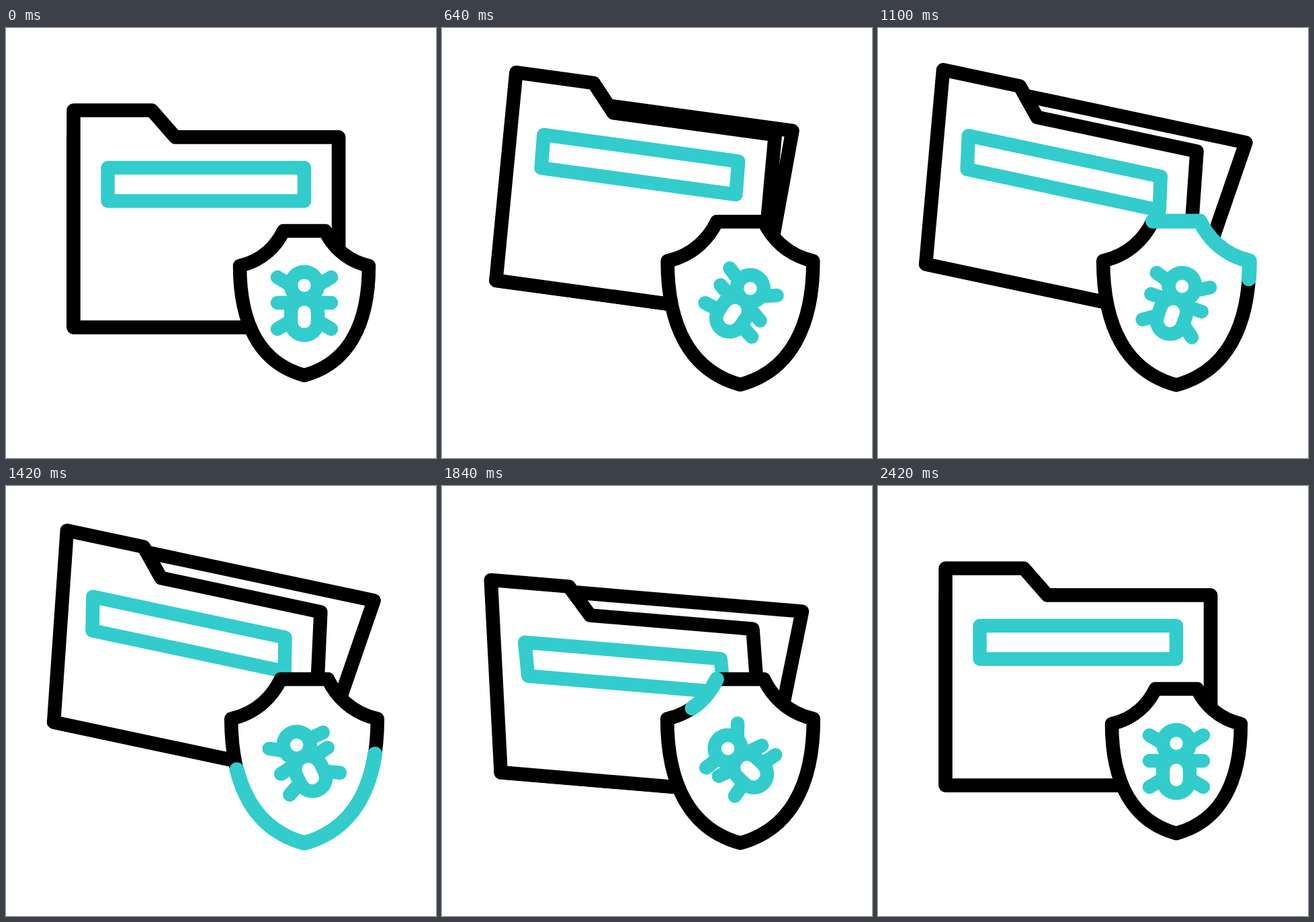
An HTML page that plays this animation: 640x640 px, repeating every 3000 ms.

```html
<!DOCTYPE html>
<html lang="en">
<head>
<meta charset="utf-8">
<title>Folder protection</title>
<style>
  html, body { margin: 0; width: 100%; height: 100%; overflow: hidden; background: #fff; }
  svg { display: block; width: 100vw; height: 100vh; }
  path, circle, rect { fill: #fff; stroke: #000; stroke-width: 20.5; stroke-linecap: round; stroke-linejoin: round; }
  .teal { stroke: #33cccc; }
  .line { fill: none; }
  #sweep { stroke-width: 22; }
</style>
</head>
<body>
<svg viewBox="0 0 640 640">
  <g id="folder">
    <path id="back"/>
    <path id="front"/>
    <path id="label" class="teal"/>
  </g>
  <path id="shield"/>
  <path id="sweep" class="teal line" pathLength="1"/>
  <g id="bug">
    <path id="legs" class="teal line"/>
    <rect class="teal" x="-20" y="-6" width="40" height="54" rx="20"/>
    <circle class="teal" cy="-26" r="20"/>
  </g>
</svg>
<script>
const LOOP = 3000, STEP = 20;
const $ = id => document.getElementById(id);
const set = (id, name, value) => $(id).setAttribute(name, value);

// Eased value from [time, value] pairs.
function track(t, keys) {
  if (t <= keys[0][0]) return keys[0][1];
  for (let i = 1; i < keys.length; i++) {
    const [t0, v0] = keys[i - 1], [t1, v1] = keys[i];
    if (t <= t1) {
      const p = (t - t0) / (t1 - t0);
      return v0 + (v1 - v0) * p * p * (3 - 2 * p);
    }
  }
  return keys[keys.length - 1][1];
}

// Goes from 0 to 1 between a and b, back to 0 between c and d.
const pulse = (t, a, b, c, d) => track(t, [[a, 0], [b, 1], [c, 1], [d, 0]]);
const poly = points => 'M' + points.map(p => p.join(' ')).join('L') + 'Z';

function drawFolder(t) {
  const lift = -49.6 * pulse(t, 200, 790, 1420, 1900);
  const tilt = 12 * pulse(t, 200, 933, 1500, 2100);
  const k = 40 * pulse(t, 225, 1355, 1780, 2370);
  const open = pulse(t, 300, 1130, 1750, 2400);
  set('folder', 'transform', `translate(0 ${lift}) rotate(${tilt} 297.5 283.5)`);

  const bx = 34 * open, by = 162.5 + 7 * open;
  set('back', 'd', poly([[100.5 + bx, by], [495 + bx, by], [495, 445.5], [100.5, 445.5]]));

  set('front', 'd', poly([
    [100.5 - k, 122.5 + k], [217 - k, 122.5 + k], [252 - k, 162.5 + k],
    [495 - k, 162.5 + k], [495, 445.5], [100.5, 445.5]
  ]));

  const top = 0.82 * k, low = 0.58 * k, drop = 1.07 * k;
  set('label', 'd', poly([
    [151.5 - top, 208 + drop], [444 - top, 208 + drop],
    [444 - low, 257.5 + drop], [151.5 - low, 257.5 + drop]
  ]));
}

function shieldPath(s) {
  const at = (x, y) => `${444 + x * s} ${409.5 + y * s} `;
  return 'M' + at(-31, -107.5) + 'L' + at(31, -107.5) +
    'C' + at(41, -86.5) + at(61, -63.5) + at(96, -55.5) +
    'C' + at(96, 30.5) + at(66, 89.5) + at(0, 107.5) +
    'C' + at(-66, 89.5) + at(-96, 30.5) + at(-96, -55.5) +
    'C' + at(-61, -63.5) + at(-41, -86.5) + at(-31, -107.5);
}

function drawShield(t) {
  const d = shieldPath(1 + 0.134 * pulse(t, 200, 700, 1900, 2400));
  set('shield', 'd', d + 'Z');
  set('sweep', 'd', d);
  const head = track(t, [[785, 0], [1715, 1]]);
  const tail = track(t, [[1090, 0], [1995, 1]]);
  const length = head - tail;
  set('sweep', 'visibility', length > 0.001 ? 'visible' : 'hidden');
  set('sweep', 'stroke-dasharray', `${Math.max(length, 0)} 2`);
  set('sweep', 'stroke-dashoffset', -tail);
}

// Side, root height, resting rise of the tip, then rise offsets at each stride time.
const STRIDES = [200, 640, 1100, 1420, 1840, 2100, 2400];
const LEGS = [
  [-1, -26, -12, 0, 4.5, 5.5, -1, 9, 5, 0],
  [-1, 0, 0, 0, -5, 0, 2.5, -7, -3, 0],
  [-1, 27, 12, 0, -9, 1, -3, -8, -2, 0],
  [1, -26, -12, 0, -2, 0, 12, -4, -2, 0],
  [1, 0, 0, 0, 5, 0, -2.5, 7, 3, 0],
  [1, 27, 12, 0, -7, 2, 0, -8, 0, 0]
];

function drawBug(t) {
  const turn = track(t, [[200, 0], [800, 42], [1700, -46], [1800, -46], [2400, 0]]);
  set('bug', 'transform', `translate(444 409) rotate(${turn})`);
  // Each leg swings around its root and keeps its length.
  set('legs', 'd', LEGS.map(([side, root, rest, ...offsets]) => {
    const rise = rest + track(t, STRIDES.map((time, i) => [time, offsets[i]]));
    const reach = Math.sqrt(400 + rest * rest - rise * rise);
    return `M${side * 20} ${root}l${side * reach} ${rise}`;
  }).join(''));
}

const start = performance.now();
function frame() {
  const elapsed = (performance.now() - start) % LOOP;
  const t = Math.floor(elapsed / STEP) * STEP;
  drawFolder(t);
  drawShield(t);
  drawBug(t);
  requestAnimationFrame(frame);
}
frame();
</script>
</body>
</html>
```
